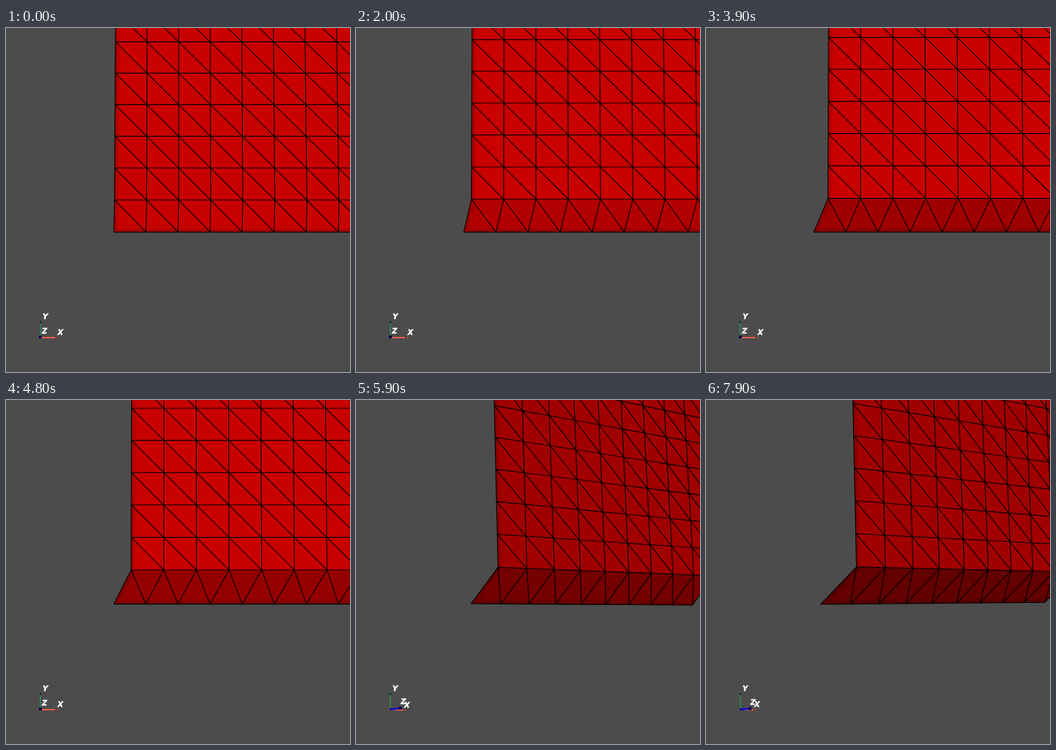
Write an HTML page with a canvas that moves like this. It is 500 by 500 pixels and loops after 8000 ms.

```html
<!DOCTYPE html>
<html lang="en">
<head>
<meta charset="utf-8">
<title>Sheared mesh</title>
<style>
  html, body { margin: 0; width: 100%; height: 100%; overflow: hidden; background: #4c4c4c; }
  canvas, svg { position: absolute; left: 0; top: 0; width: 500px; height: 500px; }
  text {
    font: italic bold 10.5px "DejaVu Sans", sans-serif;
    fill: #fff; stroke: #fff; stroke-width: .4px; text-anchor: middle;
  }
</style>
</head>
<body>
<canvas id="stage" width="500" height="500"></canvas>
<svg viewBox="0 0 500 500">
  <text id="labelX">X</text>
  <text id="labelY">Y</text>
  <text id="labelZ">Z</text>
</svg>
<script>
const LOOP = 8000, STEP = 100;
const COLS = 9, ROWS = 10, FOCAL = 933, LINE = 1.15;
const ctx = document.getElementById('stage').getContext('2d');
const labels = ['X', 'Y', 'Z'].map(n => document.getElementById('label' + n));

// Camera poses: world x and y axes as (right, up, back), shift, distance
const FRONT = { ex: [1, 0, 0], ey: [0, 1, 0], shift: [0, 0], dist: 20 };
const TURNED = { ex: [.862, -.031, -.507], ey: [-.0113, .996, -.08], shift: [.02, -.008], dist: 20.2 };
const LEVELLED = { ex: [.871, -.017, -.49], ey: [-.012, .998, -.055], shift: [.02, 0], dist: 20.2 };

const mix = (a, b, k) => a + (b - a) * k;
const mixAll = (a, b, k) => a.map((v, i) => mix(v, b[i], k));
const ramp = (t, from, to) => Math.min(1, Math.max(0, (t - from) / (to - from)));
const dot = (a, b) => a.reduce((sum, v, i) => sum + v * b[i], 0);
const unit = v => v.map(c => c / Math.sqrt(dot(v, v)));
const cross = (a, b) => [
  a[1] * b[2] - a[2] * b[1],
  a[2] * b[0] - a[0] * b[2],
  a[0] * b[1] - a[1] * b[0]
];

function blend(a, b, k) {
  return {
    ex: mixAll(a.ex, b.ex, k),
    ey: mixAll(a.ey, b.ey, k),
    shift: mixAll(a.shift, b.shift, k),
    dist: mix(a.dist, b.dist, k)
  };
}

function cameraAt(turn, level) {
  const pose = blend(blend(FRONT, TURNED, turn), LEVELLED, level);
  const ex = unit(pose.ex);
  const overlap = dot(ex, pose.ey);
  const ey = unit(pose.ey.map((v, i) => v - overlap * ex[i]));
  return { axes: [ex, ey, cross(ex, ey)], shift: pose.shift, dist: pose.dist };
}

function project(cam, p) {
  const [x, y, back] = [0, 1, 2].map(i => dot(p, cam.axes.map(a => a[i])));
  const scale = FOCAL / (cam.dist - back);
  return [250 + (x + cam.shift[0]) * scale, 250 - (y + cam.shift[1]) * scale];
}

// The bottom row is fixed; the rest slides sideways and towards the viewer.
function meshPoint(col, row, s) {
  if (row === 0) return [col - 2, -1, 0];
  const near = -.03 + .077 * s, far = -.3 + .095 * s;
  return [col - 2 + .02 + .1133 * s, row - 1 + .013 * s, mix(near, far, (row - 1) / 5)];
}

function trace(points) {
  ctx.beginPath();
  points.forEach(p => ctx.lineTo(p[0], p[1]));
}

function line(color, width, ...points) {
  trace(points);
  ctx.strokeStyle = color;
  ctx.lineWidth = width;
  ctx.stroke();
}

function fillBand(grid, low, high, red) {
  trace([grid[low][0], grid[low][COLS], grid[high][COLS], grid[high][0]]);
  ctx.fillStyle = `rgb(${Math.round(red)},0,0)`;
  ctx.fill();
}

function drawMesh(cam, s, turn) {
  const grid = [];
  for (let r = 0; r <= ROWS; r++) {
    grid.push([]);
    for (let c = 0; c <= COLS; c++) grid[r].push(project(cam, meshPoint(c, r, s)));
  }
  fillBand(grid, 1, ROWS, mix(200, 161, turn));
  fillBand(grid, 0, 1, (200 - 10.8 * s) * mix(1, .86, turn));

  // Soft shade just inside the left and bottom edges
  const rim = [grid[ROWS][0], grid[1][0], grid[0][0], grid[0][COLS]];
  ctx.save();
  trace([...rim, grid[1][COLS], grid[ROWS][COLS]]);
  ctx.clip();
  [5, 9, 13].forEach(w => line('rgba(0,0,0,.06)', w, ...rim));
  ctx.restore();

  for (let r = 0; r <= ROWS; r++) {
    line('#000', LINE, ...grid[r]);
    if (r === ROWS) break;
    for (let c = 0; c <= COLS; c++) {
      line('#000', LINE, grid[r][c], grid[r + 1][c]);
      if (c < COLS) line('#000', LINE, grid[r + 1][c], grid[r][c + 1]);
    }
  }
}

function drawAxes(cam, turn) {
  const tip = (i, len) => [50 + cam.axes[i][0] * len, 450 - cam.axes[i][1] * len];
  const [x, y, z] = [0, 1, 2];
  line('#2e8b57', 1.6, tip(y, 0), tip(y, 24));
  line('#0a2c14', 2, tip(y, 21), tip(y, 24));
  line('#ff6347', 1.8, tip(x, 0), tip(x, 25));
  line('#40100a', 2.4, tip(x, 22), tip(x, 23.5));
  line('#0000e0', 2.4, tip(z, 0), tip(z, 24));
  line('#000060', 4, tip(z, 24), tip(z, 33));
  ctx.fillStyle = '#000048';
  const side = mix(4, 2, turn);
  ctx.fillRect(50 - side / 2, 449 - side / 2, side, side);

  const offsets = [[mix(4, 2.5, turn), -4], [7, -2], [6, -6]];
  labels.forEach((label, i) => {
    const [px, py] = tip(i, 25);
    label.setAttribute('x', px + offsets[i][0]);
    label.setAttribute('y', py + offsets[i][1]);
  });
}

function draw(now) {
  const t = Math.floor((now % LOOP) / STEP) * STEP;
  const turn = ramp(t, 5400, 5700);
  const cam = cameraAt(turn, ramp(t, 6300, 6600));
  ctx.fillStyle = '#4c4c4c';
  ctx.fillRect(0, 0, 500, 500);
  drawMesh(cam, t / 1000, turn);
  drawAxes(cam, turn);
}

const start = performance.now();
function tick() {
  draw(performance.now() - start);
  requestAnimationFrame(tick);
}
tick();
</script>
</body>
</html>
```
